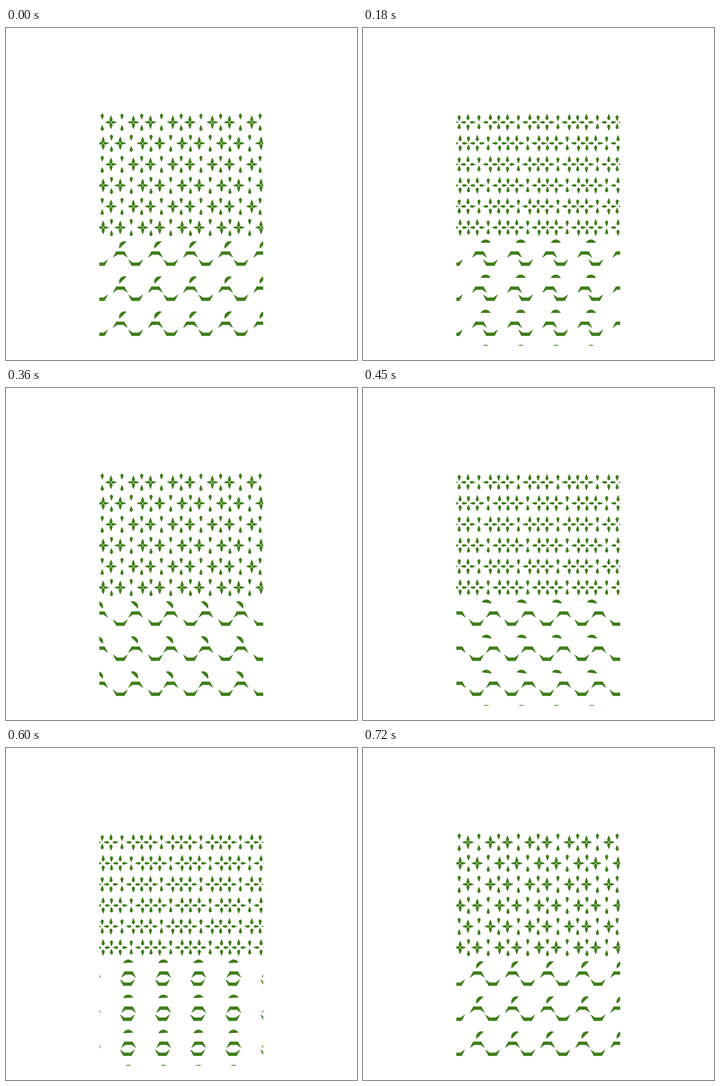
An HTML page with a canvas that plays this animation: 769 px wide and 728 px high, repeating every 750 ms.

```html
<!DOCTYPE html>
<html lang="en">
<head>
<meta charset="utf-8">
<title>Green pattern</title>
<style>
  html, body { margin: 0; width: 100%; height: 100%; overflow: hidden; background: #fff; }
  canvas { display: block; }
</style>
</head>
<body>
<canvas id="stage" width="769" height="728"></canvas>
<script>
const ctx = document.getElementById('stage').getContext('2d');
const GREEN = '#3f7f1a';
const STEP = 30, STEPS = 25, CYCLE = 24;
const BOX = { x: 204.5, y: 187.5, w: 359, h: 509 };

// CSS-like cubic Bezier easing, solved by bisection
function bezier(x1, y1, x2, y2) {
  const at = (a, b, s) => 3 * a * s * (1 - s) ** 2 + 3 * b * s * s * (1 - s) + s ** 3;
  return x => {
    let lo = 0, hi = 1;
    for (let i = 0; i < 24; i++) {
      const mid = (lo + hi) / 2;
      if (at(x1, x2, mid) < x) lo = mid; else hi = mid;
    }
    return at(y1, y2, lo);
  };
}
const fall = bezier(0.5, 0, 1, 0.5);
const glide = bezier(0.5, 0, 0.5, 1);
const mod = (a, n) => ((a % n) + n) % n;

// 0 at both ends of a half cycle, 1 in the middle
const bounce = k => 1 - fall(Math.abs(mod(k, 12) - 6) / 6);

// -1 to 1 and back, slow halfway
function swing(k) {
  const u = (mod(k, 12) - 6) / 6;
  const v = Math.sign(u) * fall(Math.abs(u));
  return k < 12 ? v : -v;
}

// -1 to 1 and back, slow at the ends
function sway(k) {
  const p = mod(k - 2.2, CYCLE) / 12;
  return 2 * glide(p < 1 ? p : 2 - p) - 1;
}

function at(x, y, angle, draw) {
  ctx.save();
  ctx.translate(x, y);
  ctx.rotate(angle);
  draw();
  ctx.restore();
}

// Drop along the y axis, from its sharp end to its blunt end
function petal(sharp, blunt, half) {
  const y = f => sharp + (blunt - sharp) * f;
  ctx.beginPath();
  ctx.moveTo(0, sharp);
  ctx.quadraticCurveTo(half * 0.65, y(0.32), half, y(0.66));
  ctx.quadraticCurveTo(half * 0.9, y(0.92), 0, blunt);
  ctx.quadraticCurveTo(-half * 0.9, y(0.92), -half, y(0.66));
  ctx.quadraticCurveTo(-half * 0.65, y(0.32), 0, sharp);
  ctx.fill();
}

function star(x, y, open) {
  const tall = 15.2 + 3.5 * open, wide = 13.2 + 4 * open;
  for (let i = 0; i < 4; i++) {
    at(x, y, i * Math.PI / 2, () =>
      i % 2 ? petal(-wide, -wide + 13, 3) : petal(-tall, -tall + 14, 3.5));
  }
}

function dropPair(x, y, open) {
  const outer = 19 - 3.6 * open;
  for (const turn of [0, Math.PI]) {
    at(x, y, turn, () => petal(-outer + 13.4, -outer, 3.5));
  }
}

function flowers(k) {
  const open = bounce(k);
  for (let row = 0; row < 6; row++) {
    const y = 206.7 + 46.15 * row, shift = row % 2 ? 20.3 : 0;
    for (let n = -2; n < 5; n++) {
      star(230 + shift + 86.5 * n, y, open);
      star(279 + shift + 86.5 * n, y, open);
    }
    for (let n = -1; n < 9; n++) dropPair(210.8 + shift + 43.25 * n, y, open);
  }
}

function arch(x, y, dir) {
  const points = [[-16.7, 14.5], [-9, 0], [9, 0], [16.7, 14.5], [6.5, 7.3], [-6.5, 7.3]];
  ctx.beginPath();
  for (const [px, py] of points) ctx.lineTo(x + px, y + py * dir);
  ctx.fill();
}

function cap() {
  const r = 12, centre = -12.6, half = Math.acos(4.8 / r);
  ctx.beginPath();
  ctx.arc(0, centre, r, -Math.PI / 2 - half, -Math.PI / 2 + half);
  ctx.fill();
}

function waves(k) {
  const slide = 18.8 * sway(k), tilt = swing(k) * Math.PI / 4;
  const tile = 76.92;
  for (let row = 0; row < 4; row++) {
    const dy = row * tile;
    for (let n = -1; n < 6; n++) {
      const x = 267.2 + n * tile;
      arch(x + slide, 489.8 + dy, 1);
      arch(x - slide, 521.5 + dy, -1);
      at(x + 1.5, 488.4 + dy, tilt, cap);
    }
  }
}

function draw(now) {
  const k = Math.floor(now / STEP) % STEPS % CYCLE;
  ctx.fillStyle = '#fff';
  ctx.fillRect(0, 0, 769, 728);
  ctx.save();
  ctx.beginPath();
  ctx.rect(BOX.x, BOX.y, BOX.w, BOX.h);
  ctx.clip();
  ctx.fillStyle = GREEN;
  flowers(k);
  waves(k);
  ctx.restore();
}

let start;
function tick(now) {
  if (start === undefined) start = now;
  draw(Math.max(0, now - start));
  requestAnimationFrame(tick);
}
draw(0);
requestAnimationFrame(tick);
</script>
</body>
</html>
```
